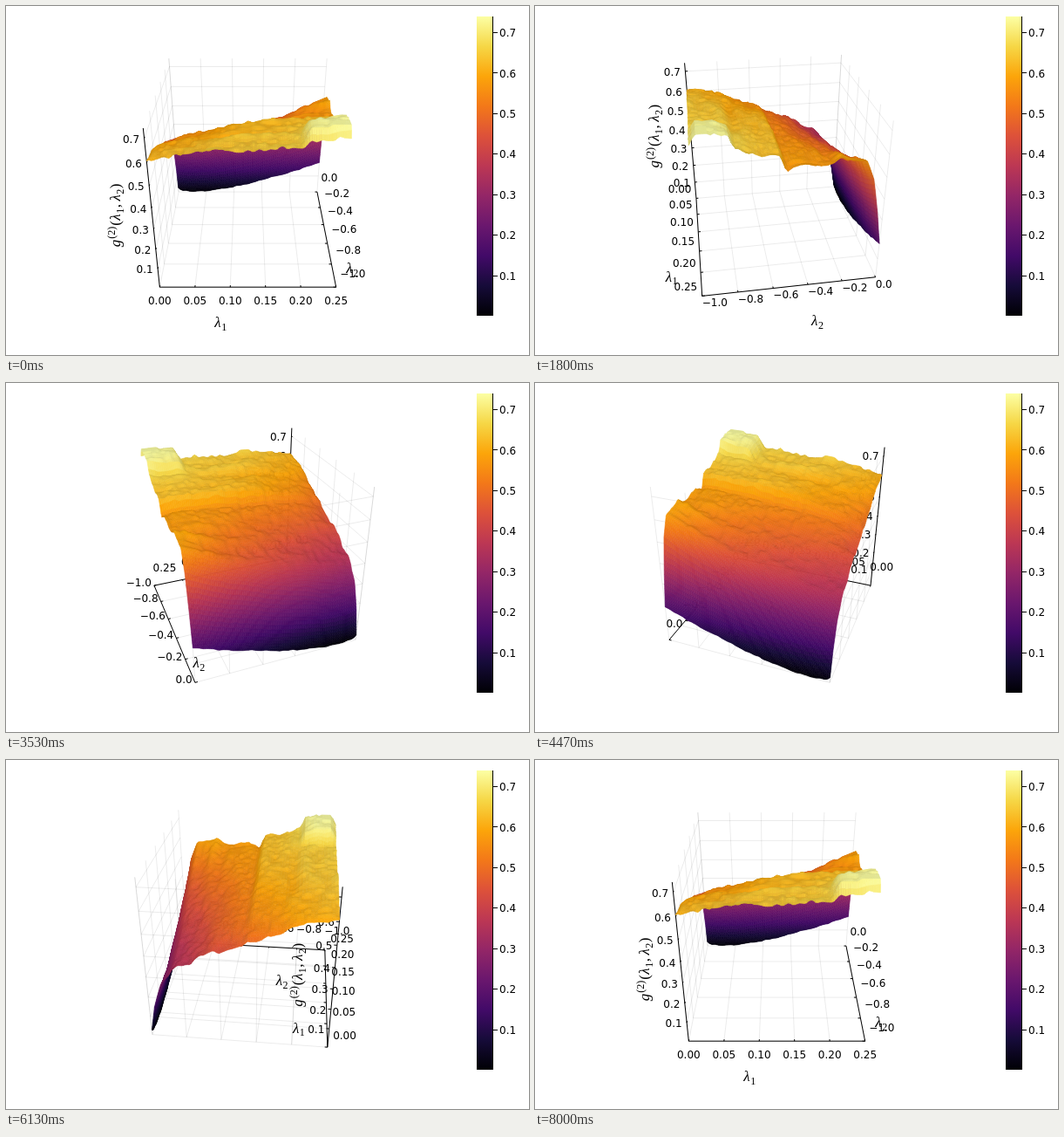
Write an HTML page with a canvas that moves like this. It is 600 px wide and 400 px high and loops after 8.07 s.

```html
<!DOCTYPE html>
<html>
<head>
<meta charset="utf-8">
<style>
html, body { margin: 0; width: 100%; height: 100%; overflow: hidden; background: #fff; }
canvas { display: block; }
</style>
</head>
<body>
<canvas id="stage" width="600" height="400"></canvas>
<script>
const ctx = document.getElementById('stage').getContext('2d');
const LOOP = 8070, ZMIN = 0.001, ZMAX = 0.74, N = 90;
const SANS = '12px "DejaVu Sans", sans-serif';
const INFERNO = [[0, 0, 4], [22, 11, 57], [66, 10, 104], [106, 23, 110], [147, 38, 103],
  [188, 55, 84], [221, 81, 58], [243, 120, 25], [252, 165, 10], [246, 215, 70], [252, 255, 164]];

const lerp = (a, b, t) => a + (b - a) * t;
const clamp = (v, a, b) => Math.min(b, Math.max(a, v));
const smooth = (v, a, b) => { const t = clamp((v - a) / (b - a), 0, 1); return t * t * (3 - 2 * t); };
const zCube = v => (v - ZMIN) / (ZMAX - ZMIN) * 2 - 1;

// Piecewise linear lookup in rows [key, value, ...]
function lookup(rows, key, col = 1) {
  let i = 1;
  while (i < rows.length - 1 && rows[i][0] < key) i++;
  const a = rows[i - 1], b = rows[i];
  return lerp(a[col], b[col], clamp((key - a[0]) / (b[0] - a[0]), 0, 1));
}

function colour(t, light = 1) {
  const p = clamp(t, 0, 1) * 10, i = Math.min(9, Math.floor(p));
  return 'rgb(' + INFERNO[i].map((c, k) => Math.round(lerp(c, INFERNO[i + 1][k], p - i) * light)) + ')';
}

// Surface: s runs along the first axis, v is the distance from the steep edge
const hash = (i, j) => { const h = Math.sin(i * 127.1 + j * 311.7) * 43758.5453; return h - Math.floor(h); };
function noise(x, y) {
  const i = Math.floor(x), j = Math.floor(y), u = smooth(x - i, 0, 1), w = smooth(y - j, 0, 1);
  return lerp(lerp(hash(i, j), hash(i + 1, j), u), lerp(hash(i, j + 1), hash(i + 1, j + 1), u), w) - 0.5;
}
const NEAR = [[0, 0.035], [0.03, 0.15], [0.08, 0.27], [0.14, 0.345], [0.26, 0.395], [0.47, 0.47], [0.82, 0.58], [1, 0.6]];
const FAR = [[0, 0.18], [0.03, 0.33], [0.07, 0.49], [0.115, 0.575], [0.25, 0.595], [0.4, 0.575],
  [0.53, 0.58], [0.56, 0.645], [0.8, 0.655], [1, 0.685]];
function height(s, v) {
  const blend = Math.pow(s, lerp(1.4, 0.52, smooth(v, 0.1, 0.6)));
  const dip = 0.045 * Math.sin(Math.PI * Math.pow(s, 0.6)) * Math.exp(-v / 0.06);
  const bump = 0.065 * smooth(s, 0.76, 0.82) * smooth(v, 0.78, 0.82) * (1 - 0.6 * smooth(v, 0.96, 1));
  const rough = 0.4 + 0.6 * smooth(v, 0.03, 0.2);
  const grain = 0.03 * noise(s * 6, v * 17) + 0.016 * noise(s * 36 + 9, v * 40);
  return clamp(lerp(lookup(NEAR, v), lookup(FAR, v), blend) - dip + bump + rough * grain, ZMIN, ZMAX);
}

// Rows lie closer together towards the steep edge
const points = [], quads = [];
for (let i = 0; i <= N; i++)
  for (let j = 0; j <= N; j++) {
    const v = Math.pow(1 - j / N, 1.6);
    points.push([i / N * 2 - 1, 1 - 2 * v, zCube(height(i / N, v))]);
  }
for (let i = 0; i < N; i++)
  for (let j = 0; j < N; j++) {
    const k = i * (N + 1) + j, ids = [k, k + 1, k + N + 2, k + N + 1];
    const [a, b, c, d] = ids.map(q => points[q]);
    const mid = [0, 1, 2].map(m => (a[m] + b[m] + c[m] + d[m]) / 4);
    const sx = (d[2] + c[2] - a[2] - b[2]) / (2 * (d[0] - a[0]));
    const sy = (b[2] + c[2] - a[2] - d[2]) / (2 * (b[1] - a[1]));
    const len = Math.hypot(sx, sy, 1);
    quads.push({ ids, mid, normal: [-sx / len, -sy / len, 1 / len], dist: 0 });
  }

// Perspective camera, 30 degrees of elevation and of view
const DIST = Math.sqrt(3) / Math.sin(Math.PI / 12), CE = Math.cos(Math.PI / 6), SE = 0.5;
let cosA = 1, sinA = 0;
function project([x, y, z]) {
  const right = x * cosA + y * sinA, fwd = y * cosA - x * sinA;
  const k = 640 / (DIST + CE * fwd - SE * z);
  return [277.5 + k * right, 184 - k * (SE * fwd + CE * z)];
}
function path(pts) {
  ctx.beginPath();
  pts.forEach(p => ctx.lineTo(...project(p)));
  ctx.stroke();
}

const range = (n, f) => Array.from({ length: n }, (_, i) => f(i));
const label = (v, n) => v.toFixed(n).replace('-', '\u2212');
const TICK = 0.03;
const axes = [
  { at: t => [t, -1, -1], tick: t => [t, -1 + TICK, -1],
    grid: t => [[t, -1, -1], [t, 1, -1], [t, 1, 1]],
    ticks: range(6, i => [i / 2.5 - 1, label(i / 20, 2)]) },
  { at: t => [1, t, -1], tick: t => [1 - TICK, t, -1],
    grid: t => [[1, t, -1], [-1, t, -1], [-1, t, 1]],
    ticks: range(6, i => [i / 2.5 - 1, i === 5 ? '0.0' : label(i / 5 - 1, 1)]) },
  { at: t => [-1, -1, t], tick: t => [-1, -1 + TICK, t],
    grid: t => [[-1, -1, t], [-1, 1, t], [1, 1, t]],
    ticks: range(7, i => [zCube((i + 1) / 10), label((i + 1) / 10, 1)]) }
];

// Tick label offset by screen angle of the axis: [degrees, dx, dy]
const OFFSETS = [[0, 0, 7.5], [40, 0, 7.5], [91, 6.5, -13], [101, 4.5, -16], [152, -1, -20], [177, -0.5, -22],
  [228, -3.5, -18.5], [269, -6, -13], [320, 0, 7.5], [360, 0, 7.5]];

function text(str, x, y, align) {
  ctx.textAlign = align;
  ctx.fillText(str, x, y + 4.4);
}

function tickLabels(axis, isZ) {
  const [x0, y0] = project(axis.at(-1)), [x1, y1] = project(axis.at(1));
  const angle = (Math.atan2(y0 - y1, x1 - x0) * 180 / Math.PI + 360) % 360;
  const level = Math.abs(y1 - y0) < 0.01;
  let dx = lookup(OFFSETS, angle, 1), dy = lookup(OFFSETS, angle, 2);
  let align = angle > 262 ? 'right' : 'left';
  if (level) { align = 'center'; dx = 0; dy = x1 > x0 ? 15 : -22; }
  if (isZ) { align = 'right'; dx = -5.5; dy = 0.5; }
  ctx.font = SANS;
  for (const [t, str] of axis.ticks) {
    const [x, y] = project(axis.at(t));
    text(str, x + dx, y + dy, align);
  }
}

// Pieces of a formula: [text, size, italic, baseline shift, gap after]
const lambda = n => [['λ', 17, 1, 0, 0.5], [n, 12, 0, 3.5, 0.5]];
const FORMULA = [['g', 17, 1, 0, 1], ['(2)', 12, 0, -6.5, 1], ['(', 17, 0, 0, 0.5], ...lambda('1'),
  [',', 17, 0, 0, 3.5], ...lambda('2'), [')', 17, 0, 0, 0]];
function formula(parts, x, y, turn) {
  const font = p => { ctx.font = (p[2] ? 'italic ' : '') + p[1] + 'px "Liberation Serif", serif'; };
  const widths = parts.map(p => { font(p); return ctx.measureText(p[0]).width + p[4]; });
  ctx.save();
  ctx.translate(x, y);
  ctx.rotate(turn);
  ctx.textAlign = 'left';
  let pos = -widths.reduce((a, b) => a + b) / 2;
  parts.forEach((p, i) => { font(p); ctx.fillText(p[0], pos, p[3]); pos += widths[i]; });
  ctx.restore();
}

function drawAxes() {
  ctx.strokeStyle = 'rgba(0,0,0,0.1)';
  ctx.lineWidth = 0.8;
  for (const a of axes) a.ticks.forEach(([t]) => path(a.grid(t)));
  ctx.strokeStyle = ctx.fillStyle = '#000';
  ctx.lineWidth = 1;
  axes.forEach((a, i) => {
    path([a.at(-1), a.at(1)]);
    a.ticks.forEach(([t]) => path([a.at(t), a.tick(t)]));
    tickLabels(a, i === 2);
  });
  const [mx, my, mz] = axes.map(a => project(a.at(0)));
  formula(lambda('1'), mx[0] - 31, mx[1] + 46, 0);
  formula(lambda('2'), my[0] + 31, my[1] + 45, 0);
  formula(FORMULA, mz[0] - 36.5, mz[1] + 1, -Math.PI / 2);
}

function drawSurface() {
  const screen = points.map(project);
  const cam = [DIST * CE * sinA, -DIST * CE * cosA, DIST * SE];
  for (const q of quads) q.dist = Math.hypot(q.mid[0] - cam[0], q.mid[1] - cam[1]);
  quads.sort((a, b) => b.dist - a.dist);
  ctx.lineWidth = 0.6;
  ctx.lineJoin = 'round';
  for (const { ids, mid, normal } of quads) {
    const view = cam.map((c, i) => c - mid[i]);
    const dot = view.reduce((sum, c, i) => sum + c * normal[i], 0) / Math.hypot(...view);
    ctx.fillStyle = ctx.strokeStyle = colour((mid[2] + 1) / 2, 0.82 + 0.18 * Math.abs(dot));
    ctx.beginPath();
    for (const k of ids) ctx.lineTo(screen[k][0], screen[k][1]);
    ctx.closePath();
    ctx.fill();
    ctx.stroke();
  }
}

function drawBar() {
  const g = ctx.createLinearGradient(0, 355, 0, 12);
  INFERNO.forEach((_, i) => g.addColorStop(i / 10, colour(i / 10)));
  ctx.fillStyle = g;
  ctx.fillRect(540, 12, 18.5, 343);
  ctx.fillStyle = '#000';
  ctx.fillRect(558, 12, 1, 343);
  ctx.font = SANS;
  for (let i = 1; i <= 7; i++) {
    const y = 355 - (i / 10 - ZMIN) / (ZMAX - ZMIN) * 343;
    ctx.fillRect(558, Math.round(y - 0.5), 6, 1);
    text(label(i / 10, 1), 566, y + 0.2, 'left');
  }
}

let shown = -1;
function frame() {
  const t = Math.floor(performance.now() % LOOP / 10) * 10;
  const step = Math.min(120, Math.floor((t + 3.4) * 0.015));
  if (step !== shown) {
    shown = step;
    const a = step % 120 * Math.PI / 60;
    cosA = Math.cos(a);
    sinA = Math.sin(a);
    ctx.fillStyle = '#fff';
    ctx.fillRect(0, 0, 600, 400);
    drawAxes();
    drawSurface();
    drawBar();
  }
  requestAnimationFrame(frame);
}
frame();
</script>
</body>
</html>
```
